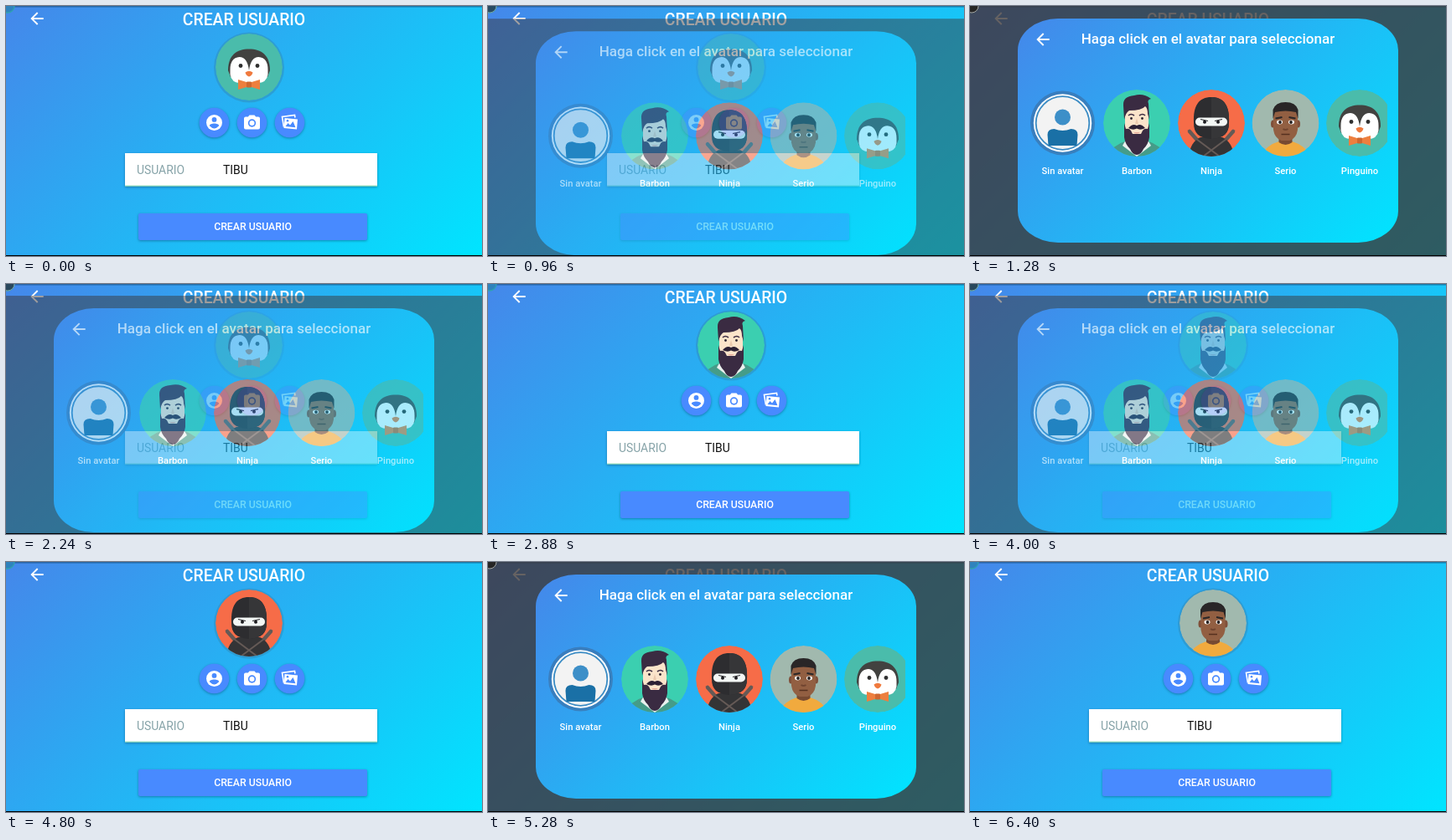
An HTML page for the animation above (9600 ms loop, 568x299 px).

```html
<!DOCTYPE html>
<html lang="es">
<head>
<meta charset="utf-8">
<title>Crear usuario</title>
<style>
  html, body { margin: 0; width: 100%; height: 100%; overflow: hidden; background: #000; }
  svg { display: block; width: 568px; height: 299px; }
  text { font-family: Roboto, sans-serif; font-weight: 500; fill: #fff; }
  .mid { text-anchor: middle; }
  .title { font-size: 19.4px; }
  .heading { font-size: 17.05px; }
  .label { font-size: 11.2px; }
  .button { font-size: 12.3px; }
  .field { font-size: 13.9px; font-weight: 400; }
  .raised { filter: drop-shadow(0 1.5px 1.5px rgba(0, 30, 60, .38)); }
</style>
</head>
<body>
<svg viewBox="0 0 568 299">
  <defs>
    <linearGradient id="pageFill" gradientUnits="userSpaceOnUse" x1="67.25" y1="-67.25" x2="500.75" y2="366.25">
      <stop stop-color="#4587ea"/><stop offset="1" stop-color="#00e5ff"/>
    </linearGradient>
    <linearGradient id="cardFill" gradientUnits="userSpaceOnUse" x1="103.5" y1="-31.5" x2="464.5" y2="329.5">
      <stop stop-color="#4587ea"/><stop offset="1" stop-color="#00e5ff"/>
    </linearGradient>
    <clipPath id="disc"><circle r="40"/></clipPath>
    <clipPath id="strip"><rect x="57" y="90" width="441" height="130"/></clipPath>

    <path id="back" d="M8 -1H-4.2L1.4 -6.6 0 -8 -8 0 0 8 1.4 6.6 -4.2 1H8Z" fill="#fff" transform="scale(.96)"/>

    <g id="none">
      <circle r="38.5" fill="#3a75ae" opacity=".75"/>
      <circle r="34.7" fill="#fff"/>
      <circle r="31.8" fill="#f3f3f3" stroke="#3c8cc4" stroke-width="1.8"/>
      <circle cy="-7" r="9.5" fill="#3d8fc8"/>
      <path d="M-17 27L-18 14Q-18 7 -10 7Q0 11 10 7Q18 7 18 14L17 27Z" fill="#1a70a6"/>
    </g>

    <g id="bearded" clip-path="url(#disc)">
      <circle r="40" fill="#3bcfb0"/>
      <path d="M-36 40Q-30 27 -12 21H12Q30 27 36 40Z" fill="#459c89"/>
      <path d="M-13 20L-17 27 0 40 17 27 13 20Z" fill="#e9f1ee"/>
      <path d="M-9 10H9V26L0 36 -9 26Z" fill="#eccdb0"/>
      <path d="M-14 -20H14V10Q10 20 0 21Q-10 20 -14 10Z" fill="#fbe4ca"/>
      <path d="M-15 -4L-16 -21Q-17 -32 -3 -33Q8 -36 17 -29Q12 -28 14 -23L15 -4 13 -11Q13 -18 10 -20Q6 -15 -9 -15Q-13 -13 -15 -4Z" fill="#3a2b42"/>
      <path d="M-15 0L-13 7Q-9 6 -7 9L-5 13H5L7 9Q9 6 13 7L15 0V17Q14 25 8 31Q5 38 0 38T-8 31Q-14 25 -15 17Z" fill="#3a2b42"/>
      <path d="M-10 6Q-5 0 0 3Q5 0 10 6Q4 9 0 6.500Q-4 9 -10 6Z" fill="#2c2034"/>
      <path d="M-4 11H4Q0 14 -4 11Z" fill="#e6a99a"/>
      <path d="M-10 -9Q-7 -12 -3 -9M3 -9Q7 -12 10 -9" fill="none" stroke="#3a2b42" stroke-width="1.600"/>
      <g fill="#2b2430"><circle cx="-6.500" cy="-5.500" r="1.400"/><circle cx="6.500" cy="-5.500" r="1.400"/></g>
      <path d="M0 -6L-2 1H2Z" fill="#ebcaae"/>
    </g>

    <g id="ninja" clip-path="url(#disc)">
      <circle r="40" fill="#f66c48"/>
      <path id="hilt" d="M-26 10L-5 34" stroke="#655a56" stroke-width="4.5" stroke-linecap="round"/>
      <use href="#hilt" transform="scale(-1 1)"/>
      <path d="M-27 42Q-26 23 -13 17H13Q26 23 27 42Z" fill="#343436"/>
      <path d="M-18 19L10 40M18 19L-10 40" stroke="#655a56" stroke-width="2"/>
      <path d="M-21 0C-22 -21 -15 -31 0 -31S22 -21 21 0C21 12 15 18 0 19C-15 18 -21 12 -21 0Z" fill="#2d2d30"/>
      <path d="M0 -31C15 -31 22 -21 21 0C21 12 15 18 0 19Z" fill="#363638"/>
      <rect x="-19" y="-6.500" width="38" height="10" rx="5" fill="#f3f7f5"/>
      <path d="M-13 -4.500L-4 -2.500M13 -4.500L4 -2.500" stroke="#2d2d30" stroke-width="1.200"/>
      <g fill="#1d1d20"><circle cx="-8" cy="-1.300" r="2"/><circle cx="8" cy="-1.300" r="2"/></g>
    </g>

    <g id="serious" clip-path="url(#disc)">
      <circle r="40" fill="#a1b9ae"/>
      <path d="M-30 42Q-25 27 -8 22H8Q25 27 30 42Z" fill="#f1aa3e"/>
      <path d="M-8 12H8V23Q0 29 -8 23Z" fill="#774a32"/>
      <g fill="#80503a"><ellipse cx="-15" cy="1" rx="2.500" ry="4.500"/><ellipse cx="15" cy="1" rx="2.500" ry="4.500"/></g>
      <path d="M-14.500 -16H14.500V8Q13 18 5 21H-5Q-13 18 -14.500 8Z" fill="#925f42"/>
      <path d="M-15 -5V-16Q-12 -25 0 -25T15 -16V-5L12.500 -13Q0 -16 -12.500 -13Z" fill="#292627"/>
      <path d="M-12 -5.500L-4 -7M4 -7L12 -5.500" stroke="#292627" stroke-width="2"/>
      <g fill="#fff"><ellipse cx="-7" cy="-1" rx="3.500" ry="2.400"/><ellipse cx="7" cy="-1" rx="3.500" ry="2.400"/></g>
      <g fill="#252020"><circle cx="-6.500" cy="-1" r="1.900"/><circle cx="6.500" cy="-1" r="1.900"/></g>
      <path d="M-3 7Q0 9 3 7" fill="none" stroke="#714530" stroke-width="1.800"/>
      <path d="M-5 13.500H5" stroke="#55301f" stroke-width="1.600"/>
    </g>

    <g id="penguin" clip-path="url(#disc)">
      <circle r="40" fill="#4abcab"/>
      <path d="M-25 4C-25 -14 -15 -21.500 0 -21.500S25 -14 25 4L22 12H-22Z" fill="#424240"/>
      <path d="M0 4Q-2 -12 -11.500 -12Q-22.500 -11 -22.500 3V9Q-21 19 -10 19H10Q21 19 22.500 9V3Q22.500 -11 11.500 -12Q2 -12 0 4Z" fill="#fff"/>
      <g fill="#303030"><circle cx="-10" cy="-1.500" r="2.400"/><circle cx="10" cy="-1.500" r="2.400"/></g>
      <path d="M-4.500 6.500Q0 3 4.500 6.500Q3.500 10.500 0 11.500Q-3.500 10.500 -4.500 6.500Z" fill="#f07a3e"/>
      <path d="M-13 15L-3 18H3L13 15V27L3 24H-3L-13 27Z" fill="#ed7f3f"/>
      <rect x="-3" y="17.500" width="6" height="7" rx="1" fill="#cf6730"/>
    </g>
  </defs>

  <rect width="568" height="299" fill="url(#pageFill)"/>
  <use href="#back" x="37" y="15"/>
  <text class="title mid" x="284" y="23.300">CREAR USUARIO</text>
  <circle cx="290" cy="73.500" r="42" fill="#318fbd" opacity=".55"/>
  <use id="avatar" href="#penguin" transform="translate(290 73)"/>

  <g class="raised" fill="#488aff">
    <circle cx="248.500" cy="139.500" r="17.800"/>
    <circle cx="293.500" cy="139.500" r="17.800"/>
    <circle cx="338.500" cy="139.500" r="17.800"/>
  </g>
  <g transform="translate(248.500 139.500)">
    <circle r="9.500" fill="#fff"/>
    <circle cy="-3.600" r="2.900" fill="#488aff"/>
    <path d="M-5.700 3.800C-5.500 0 5.500 0 5.700 3.800Q0 10 -5.700 3.800Z" fill="#488aff"/>
  </g>
  <g transform="translate(293.500 139.500)" fill="#fff">
    <path d="M-3 -9H3L4.700 -7H7.500Q9.500 -7 9.500 -5V6Q9.500 8 7.500 8H-7.500Q-9.500 8 -9.500 6V-5Q-9.500 -7 -7.500 -7H-4.700Z"/>
    <circle cy=".500" r="4.700" fill="#488aff"/><circle cy=".500" r="3"/>
  </g>
  <g transform="translate(338.500 139.500)">
    <path d="M-7 5L-9 -7 6 -9 6.500 -6" fill="none" stroke="#fff" stroke-width="1.600"/>
    <path d="M-6 -5.500L9.500 -4 8.500 8 -7 6.500Z" fill="#fff"/>
    <path d="M-5 4.500L-2 .500 .500 3 4 -1.500 7 5.700Z" fill="#488aff"/>
    <circle cx="-2.500" cy="-2.300" r="1.300" fill="#488aff"/>
  </g>

  <g class="raised">
    <rect x="142" y="176" width="301" height="39.500" fill="#fff"/>
    <rect x="142" y="214.700" width="301" height=".800" fill="#62cf9a"/>
  </g>
  <text class="field" x="156" y="200.500" style="fill:#86a3a8">USUARIO</text>
  <text class="field" x="259" y="200.500" style="fill:#101010">TIBU</text>
  <rect class="raised" x="158" y="248" width="273" height="32" rx="2" fill="#488aff"/>
  <text class="button mid" x="294.500" y="268.400">CREAR USUARIO</text>
  <rect width="568" height="1.500" fill="#174b78" opacity=".6"/>
  <circle cx="2" r="8" fill="#2f83bd" stroke="#2fa3b0" stroke-width="1.300"/>

  <g id="sheet">
    <rect width="568" height="299" fill="#3c3637" opacity=".78"/>
    <rect x="57" y="15" width="454" height="268" rx="48" ry="38" fill="url(#cardFill)"/>
    <use href="#back" x="87" y="40"/>
    <text class="heading mid" x="284" y="45.300">Haga click en el avatar para seleccionar</text>
    <g id="choices" clip-path="url(#strip)"></g>
  </g>
  <circle id="corner" cx="2" r="8" fill="#262626" stroke="#a5a5a5"/>
  <rect y="298" width="568" height="1" fill="#000"/>
</svg>
<script>
  const LOOP = 9600, DROP = 38;
  const byId = id => document.getElementById(id);
  const sheet = byId('sheet'), corner = byId('corner'), avatar = byId('avatar');

  const choices = [
    ['none', 'Sin avatar', 110.5], ['bearded', 'Barbon', 199], ['ninja', 'Ninja', 288],
    ['serious', 'Serio', 376.5], ['penguin', 'Pinguino', 465]
  ];
  byId('choices').innerHTML = choices.map(([id, name, x]) =>
    `<use href="#${id}" transform="translate(${x} 140)"/>
     <text class="label mid" x="${x}" y="201">${name}</text>`).join('');

  // start time, sheet visibility, chosen avatar
  const steps = [
    [0, 0, 'penguin'], [960, .6, 'penguin'], [1120, 1, 'penguin'], [2240, .63, 'penguin'],
    [2400, 0, 'bearded'], [3040, .6, 'bearded'], [3200, 1, 'bearded'], [4000, .63, 'bearded'],
    [4160, 0, 'ninja'], [4960, .6, 'ninja'], [5120, 1, 'ninja'], [6240, .63, 'ninja'],
    [6400, 0, 'serious']
  ];

  let shown;
  function draw(now) {
    const t = now % LOOP;
    const step = steps.filter(([start]) => start <= t).pop();
    if (step !== shown) {
      const [, visible, id] = shown = step;
      sheet.style.opacity = corner.style.opacity = visible;
      sheet.setAttribute('transform', `translate(0 ${(1 - visible) * DROP})`);
      avatar.setAttribute('href', '#' + id);
    }
    requestAnimationFrame(draw);
  }
  draw(0);
</script>
</body>
</html>
```
